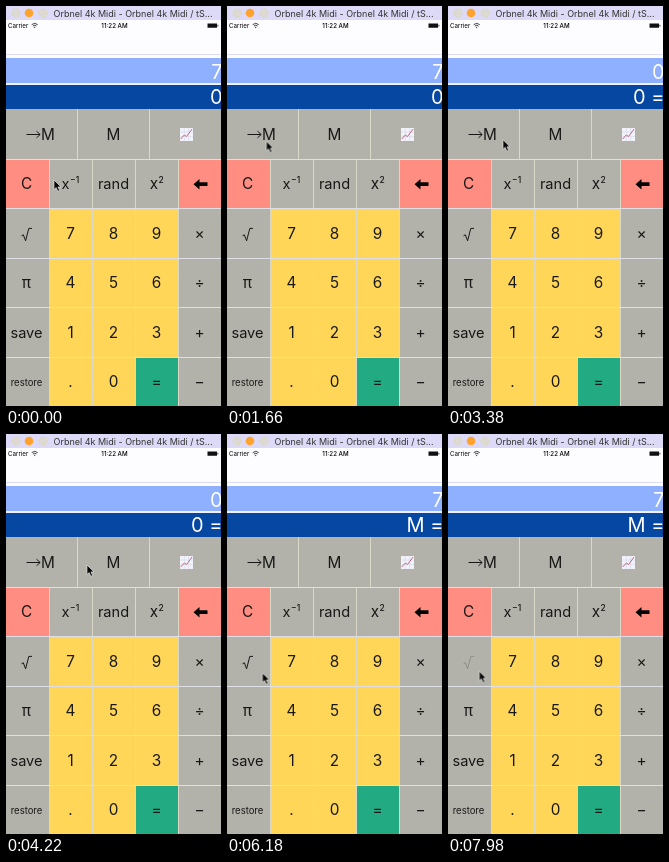
Write an HTML page that moves like this. It is 215 px wide and 400 px high and loops after 8 s.

```html
<!DOCTYPE html>
<html lang="en">
<head>
<meta charset="utf-8">
<title>Calculator</title>
<style>
  html, body { margin: 0; width: 100%; height: 100%; overflow: hidden; background: #fdfdff; }
  svg { display: block; width: 100vw; height: 100vh; }
  text { font-family: Inter, "Open Sans", sans-serif; white-space: pre; }
  rect { shape-rendering: crispEdges; }
  .label { font-size: 15.3px; text-anchor: middle; fill: #181818; }
  .display { font-size: 20px; text-anchor: end; fill: #fff; }
  .line { fill: none; stroke: #181818; stroke-width: 1; }
  .play { animation: 8s linear infinite; }
  #cursor { animation-name: travel; }
  #before { animation-name: before; }
  #stored { animation-name: stored; }
  #recalled { animation-name: recalled; }
  #toMemory { animation-name: pressStore; }
  #memory { animation-name: pressMemory; }
  #root { animation-name: pressRoot; }

  @keyframes travel {
    0% { transform: translate(48px, 174px); animation-timing-function: ease-in-out; }
    10.5% { transform: translate(40.4px, 148.3px); animation-timing-function: ease-out; }
    16%, 38% { transform: translate(39.4px, 135.3px); animation-timing-function: ease-in-out; }
    48%, 69.5% { transform: translate(81px, 131px); animation-timing-function: ease-in-out; }
    77% { transform: translate(35.7px, 239px); animation-timing-function: ease-out; }
    83%, 100% { transform: translate(31.3px, 237.3px); }
  }
  @keyframes before { 0%, 35% { opacity: 1; } 35.01%, 100% { opacity: 0; } }
  @keyframes stored { 0%, 35% { opacity: 0; } 35.01%, 66.25% { opacity: 1; } 66.26%, 100% { opacity: 0; } }
  @keyframes recalled { 0%, 66.25% { opacity: 0; } 66.26%, 100% { opacity: 1; } }
  @keyframes pressStore { 0%, 32.5% { opacity: 1; } 32.51%, 35% { opacity: .3; } 38%, 100% { opacity: 1; } }
  @keyframes pressMemory { 0%, 64.5% { opacity: 1; } 64.51%, 66.8% { opacity: .3; } 69.5%, 100% { opacity: 1; } }
  @keyframes pressRoot { 0%, 98% { opacity: 1; } 98.01%, 100% { opacity: .22; } }
</style>
</head>
<body>
<svg viewBox="0 0 215 400" preserveAspectRatio="none">
  <rect width="215" height="400" fill="#fdfdff"/>

  <rect width="215" height="14" fill="#dcdaf6"/>
  <g stroke="#dcd58a" stroke-width=".8" stroke-dasharray="1.5 1.5">
    <circle cx="10" cy="7" r="4" fill="#dddad6"/>
    <circle cx="23" cy="7" r="4.3" fill="#ffa32e" stroke="none"/>
    <circle cx="37" cy="7" r="4" fill="#dddad6"/>
  </g>
  <text x="47.5" y="10.5" font-size="9" fill="#333">Orbnel 4k Midi - Orbnel 4k Midi / tS...</text>

  <text x="2" y="22" font-size="6.2">Carrier</text>
  <g fill="none" stroke="#111" stroke-width=".8">
    <path d="M25.7 18.6q3-2.6 6 0M26.9 20q1.8-1.5 3.6 0"/>
    <circle cx="28.7" cy="21.4" r=".3"/>
  </g>
  <text x="108.5" y="22" font-size="6.2" font-weight="500" text-anchor="middle">11:22 AM</text>
  <path d="M201.5 17.5h9.5v4.2h-9.5zM211.5 18.8h.8v1.6h-.8z" fill="#111"/>

  <rect y="48" width="215" height="1" fill="#dcdcf6"/>
  <rect y="52" width="215" height="25" fill="#8eb0fe"/>
  <rect y="77" width="215" height="2" fill="#eef1ff"/>
  <rect y="79" width="215" height="24" fill="#0647a2"/>
  <g class="display">
    <g id="before" class="play"><text x="216.5" y="72.5">7</text><text x="216.5" y="98">0</text></g>
    <g id="stored" class="play"><text x="216.5" y="72.5">0</text><text x="216.5" y="98">0 =</text></g>
    <g id="recalled" class="play"><text x="216.5" y="72.5">7</text><text x="216.5" y="98">M =</text></g>
  </g>

  <g id="keys"></g>

  <g id="toMemory" class="play">
    <path class="line" d="M20.5 128.5H34M30.5 125.2l3.7 3.3-3.7 3.3"/>
    <text class="label" x="42" y="134">M</text>
  </g>
  <text id="memory" class="label play" x="107.5" y="134">M</text>
  <g>
    <rect x="174" y="122" width="13" height="13" fill="#f2f2fa"/>
    <path d="M174 126h13M174 130.5h13M178.3 122V135M182.6 122V135" stroke="#cdd3e4" stroke-width=".5"/>
    <path d="M174.7 133l3.6-4 2.2 1.5 5.6-7.5" fill="none" stroke="#c2687f" stroke-width="1"/>
  </g>
  <path id="root" class="line play" d="M15.5 229.8l1.8-1 2.3 6 3.2-12.4h3.2"/>
  <path d="M187.5 178.2l6-5.2v3.3h8v3.8h-8v3.3z" fill="#050505"/>

  <g id="cursor" class="play">
    <path d="M0 0v9.6l2.2-2 1.6 3.7 1.8-.8L4 6.9h3z" fill="#080808" stroke="#f4f4f4" stroke-width=".6"/>
  </g>
</svg>
<script>
  const GREY = '#b2b2aa', PINK = '#ff8d81', YELLOW = '#ffd657', GREEN = '#22ab83';
  const TOP = 103.5, ROW = 49.5, WIDTH = 215;
  const keys = document.getElementById('keys');

  function add(tag, attrs, text = '') {
    const node = document.createElementNS('http://www.w3.org/2000/svg', tag);
    for (const name in attrs) node.setAttribute(name, attrs[name]);
    node.textContent = text;
    keys.append(node);
  }

  // Blank labels belong to keys whose symbols are drawn above.
  const rows = [
    ['', '', ''],
    ['C', 'x|−1', 'rand', 'x|2', ''],
    ['', '7', '8', '9', '×'],
    ['π', '4', '5', '6', '÷'],
    ['save', '1', '2', '3', '+'],
    ['restore', '.', '0', '=', '−']
  ];

  function colour(row, col, label) {
    if (row === 1 && (col === 0 || col === 4)) return PINK;
    if (label === '=') return GREEN;
    return row > 1 && col > 0 && col < 4 ? YELLOW : GREY;
  }

  rows.forEach((labels, row) => {
    const width = WIDTH / labels.length, y = TOP + row * ROW, top = Math.floor(y);
    labels.forEach((label, col) => {
      const x = col * width, left = Math.round(x - .5);
      add('rect', { x: left, y: top, width: width + 1, height: ROW + 1, fill: colour(row, col, label) });
      if (col) add('rect', { x: left, y: top, width: 1, height: ROW + 1, fill: '#dad9c8' });
      if (!label) return;
      const [base, power] = label.split('|');
      const small = label === 'restore';
      const size = small ? 9.5 : label.length > 3 ? 14.6 : 15.3;
      const center = x + width / 2 - (col ? 0 : 1);
      add('text', {
        class: 'label', x: center - (power ? power.length * 2.5 : 0),
        y: y + (small ? 28.5 : 30.3), style: `font-size:${size}px`
      }, base);
      if (power) add('text', {
        x: center + (power.length > 1 ? -.5 : 2), y: y + 24,
        'font-size': 8.5, 'font-weight': 500, fill: '#181818'
      }, power);
    });
    if (row) add('rect', { x: 0, y: top, width: WIDTH, height: 1, fill: '#dedee6' });
  });
</script>
</body>
</html>
```
